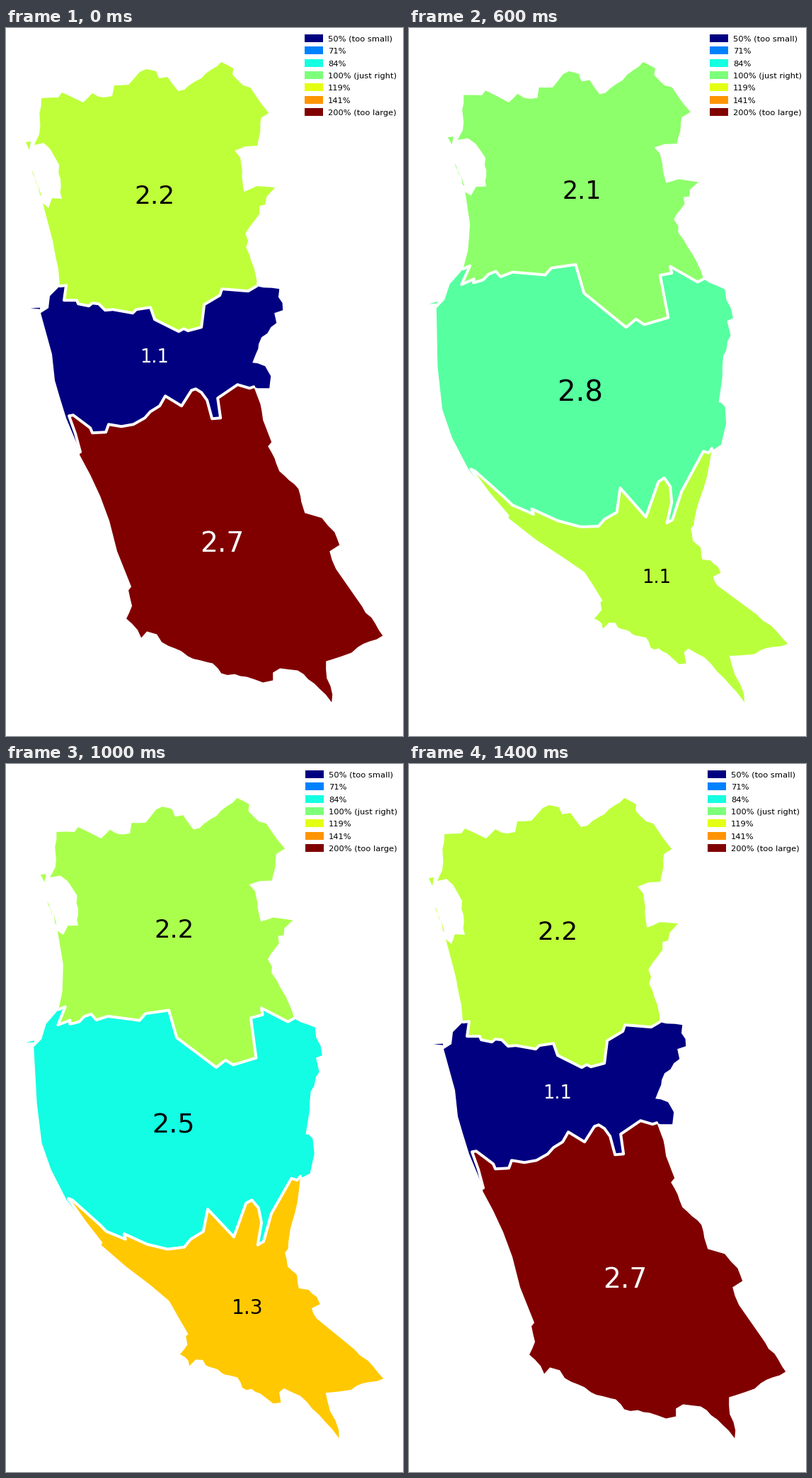
These frames come from a looping animation (561x999 px, 1500 ms). A matplotlib script:

```python
import numpy as np
import matplotlib.pyplot as plt
from matplotlib.animation import FuncAnimation
from matplotlib.patches import Polygon, Rectangle

W, H, DPI = 561, 999, 64
PT = 72 / DPI                      # points per pixel
STEPS, LAST = 15, 7
LEFT, TOP, BOTTOM = 28, 48, 951.5  # map position on the stage
TARGET = np.array([2, 3, 1])       # wanted area of each region

rng = np.random.default_rng(4)


def pts(*flat):
    return np.array(flat, float).reshape(-1, 2)


def rough(line, gap=9, size=1.0):
    """Break long edges into short ones with a little sideways noise."""
    out = []
    for a, b in zip(line[:-1], line[1:]):
        n = max(1, int(np.hypot(*(b - a)) / gap))
        t = np.arange(n)[:, None] / n
        noise = rng.normal(0, size, (n, 2))
        noise[0] = 0
        out.append(a + t * (b - a) + noise)
    return np.vstack(out + [line[-1:]])


# Key points of the undistorted map
top_west = pts(74, 340, 70, 322, 66, 300)
lagoon = pts(52, 247, 60, 254, 65, 240, 79, 241, 75, 193, 62, 170, 53, 162,
             40, 165, 47, 150, 50, 99)
north_coast = pts(
    50, 99, 74, 98, 79, 91, 109, 105, 122, 92, 131, 97, 150, 96, 153, 81,
    173, 80, 189, 62, 198, 58, 212, 61, 216, 71, 228, 69, 243, 89, 276, 71,
    304, 48)
top_east = pts(
    304, 48, 321, 57, 320, 66, 335, 81, 345, 84, 360, 106, 371, 120, 360, 127,
    355, 166, 338, 167, 323, 173, 331, 183, 336, 231, 354, 223, 380, 225,
    368, 238, 366, 249, 358, 251, 358, 262, 338, 290, 344, 320, 354, 355)
border_north = pts(
    76, 364, 85, 363, 82, 384, 100, 384, 102, 389, 117, 392, 122, 388,
    131, 389, 140, 398, 151, 397, 179, 402, 184, 397, 204, 394, 210, 411,
    244, 428, 251, 424, 257, 427, 276, 422, 280, 390, 302, 377, 305, 368,
    342, 371, 354, 364)
mid_east = pts(354, 364, 386, 368, 391, 398, 379, 402, 382, 416, 361, 436,
               348, 472, 366, 477, 374, 491, 372, 508, 355, 508)
border_south = pts(
    105, 598, 98, 572, 89, 547, 95, 546, 119, 564, 122, 571, 141, 570,
    145, 559, 163, 562, 180, 559, 196, 550, 204, 541, 217, 533, 225, 519,
    248, 533, 262, 511, 268, 509, 276, 514, 284, 525, 291, 551, 303, 550,
    299, 522, 327, 503, 344, 508, 350, 506)
mid_west = pts(85, 550, 76, 521, 69, 497, 65, 460, 49, 402, 60, 395, 62, 378)
low_east = pts(
    350, 506, 361, 539, 363, 553, 375, 584, 370, 590, 386, 625, 413, 650,
    417, 668, 422, 684, 446, 691, 464, 711, 471, 729, 457, 738, 466, 763)
low_south = pts(
    503, 816, 532, 857, 497, 873, 474, 886, 452, 893, 453, 917, 461, 940,
    460, 951, 443, 932, 412, 906, 387, 903, 377, 909, 377, 920, 363, 923,
    340, 915, 304, 910, 292, 896, 257, 886, 239, 875, 220, 866, 213, 855,
    199, 851, 191, 860, 186, 849, 170, 833, 178, 815, 173, 793)
low_west = pts(177, 788, 157, 738, 146, 695, 133, 660, 119, 630, 104, 602)

# Main part of each region, then islets, then the two white borders
regions = [
    np.vstack([top_west, rough(lagoon), rough(north_coast), rough(top_east),
               border_north[::-1]]),
    np.vstack([border_north, rough(mid_east), border_south[::-1], mid_west]),
    np.vstack([border_south, rough(low_east), rough(low_south), low_west]),
]
islets = [pts(28, 161, 35, 160, 33, 172), pts(37, 200, 41, 212, 38, 206),
          pts(41, 211, 44, 222, 42, 217), pts(45, 220, 50, 237, 48, 235),
          pts(34.5, 395, 48, 394.5, 48, 396.5)]
owner = [0, 1, 2, 0, 0, 0, 0, 1]
START = regions + islets + [border_north, border_south]


def measure(p):
    """Area and centroid of a polygon."""
    q = np.roll(p, -1, 0)
    cross = p[:, 0] * q[:, 1] - q[:, 0] * p[:, 1]
    return abs(cross.sum()) / 2, (p + q).T @ cross / (3 * cross.sum())


def survey(parts):
    area, centre = zip(*(measure(p) for p in parts[:3]))
    area = np.array(area)
    return area, centre, area / area.sum() * TARGET.sum()


def fit(parts):
    """Scale to the stage height and align left."""
    every = np.vstack(parts)
    low, high = every.min(0), every.max(0)
    scale = (BOTTOM - TOP) / (high[1] - low[1])
    return [(p - low) * scale + (LEFT, TOP) for p in parts]


def distort(parts):
    """One rubber-sheet step of Dougenik's cartogram method."""
    area, centre, share = survey(parts)
    radius = np.sqrt(area / np.pi)
    mass = radius * (np.sqrt(TARGET / share) - 1)
    calm = 1 / (1 + np.maximum(share / TARGET, TARGET / share).mean())

    def push(p):
        shift = np.zeros_like(p)
        for c, r, m in zip(centre, radius, mass):
            d = p - c
            dist = np.hypot(*d.T)
            k = dist / r
            force = np.where(k > 1, m / k, m * k ** 2 * (4 - 3 * k))
            shift += d * (force / dist)[:, None]
        return p + calm * shift
    return fit([push(p) for p in parts])


states = [fit(START)]
for _ in range(LAST):
    states.append(distort(states[-1]))


def jet(x):
    return plt.cm.jet(float(np.clip(x, 0, 1)))


def ink(color):
    return "white" if np.dot(color[:3], (0.299, 0.587, 0.114)) < 0.4 else "black"


plt.rcParams["font.family"] = "DejaVu Sans"
fig = plt.figure(figsize=(W / DPI, H / DPI), dpi=DPI, facecolor="white")
ax = fig.add_axes([0, 0, 1, 1])
ax.set(xlim=(0, W), ylim=(H, 0))
ax.axis("off")

patches = [ax.add_patch(Polygon(p, closed=True, lw=0)) for p in START[:-2]]
lines = [ax.plot([], [], color="white", lw=4 * PT, solid_joinstyle="round",
                 solid_capstyle="round")[0] for _ in range(2)]
labels = [ax.text(0, 0, "", ha="center", va="baseline") for _ in TARGET]

legend = []
for row, x in enumerate((0, 0.25, 0.375, 0.5, 0.625, 0.75, 1)):
    note = {0: " (too small)", 0.5: " (just right)", 1: " (too large)"}.get(x, "")
    y = round(9 + 17.33 * row)
    box = ax.add_patch(Rectangle((0, y), 26, 11, color=jet(x), lw=0))
    text = ax.text(0, y + 10, f"{100 * 2 ** (2 * x - 1):.0f}%{note}",
                   fontsize=11.45 * PT, va="baseline")
    legend.append((box, text))


def draw(frame):
    parts = states[LAST - abs(LAST - frame)]
    _, centre, share = survey(parts)
    colors = [jet(0.5 + np.log2(r) / 2) for r in share / TARGET]
    for patch, p, region in zip(patches, parts, owner):
        patch.set_xy(p)
        patch.set_facecolor(colors[region])
    for line, p in zip(lines, parts[-2:]):
        line.set_data(*p.T)
    for label, (x, y), a, color in zip(labels, centre, share, colors):
        px = 24.5 * a ** 0.48
        label.set(text=f"{a:.1f}", position=(x, y + 0.365 * px),
                  fontsize=px * PT, color=ink(color))
    left = np.floor(np.vstack(parts)[:, 0].max() - 110)
    for box, text in legend:
        box.set_x(left)
        text.set_x(left + 33)


anim = FuncAnimation(fig, draw, frames=STEPS, interval=100, repeat=True,
                     repeat_delay=0)
plt.show()
```
